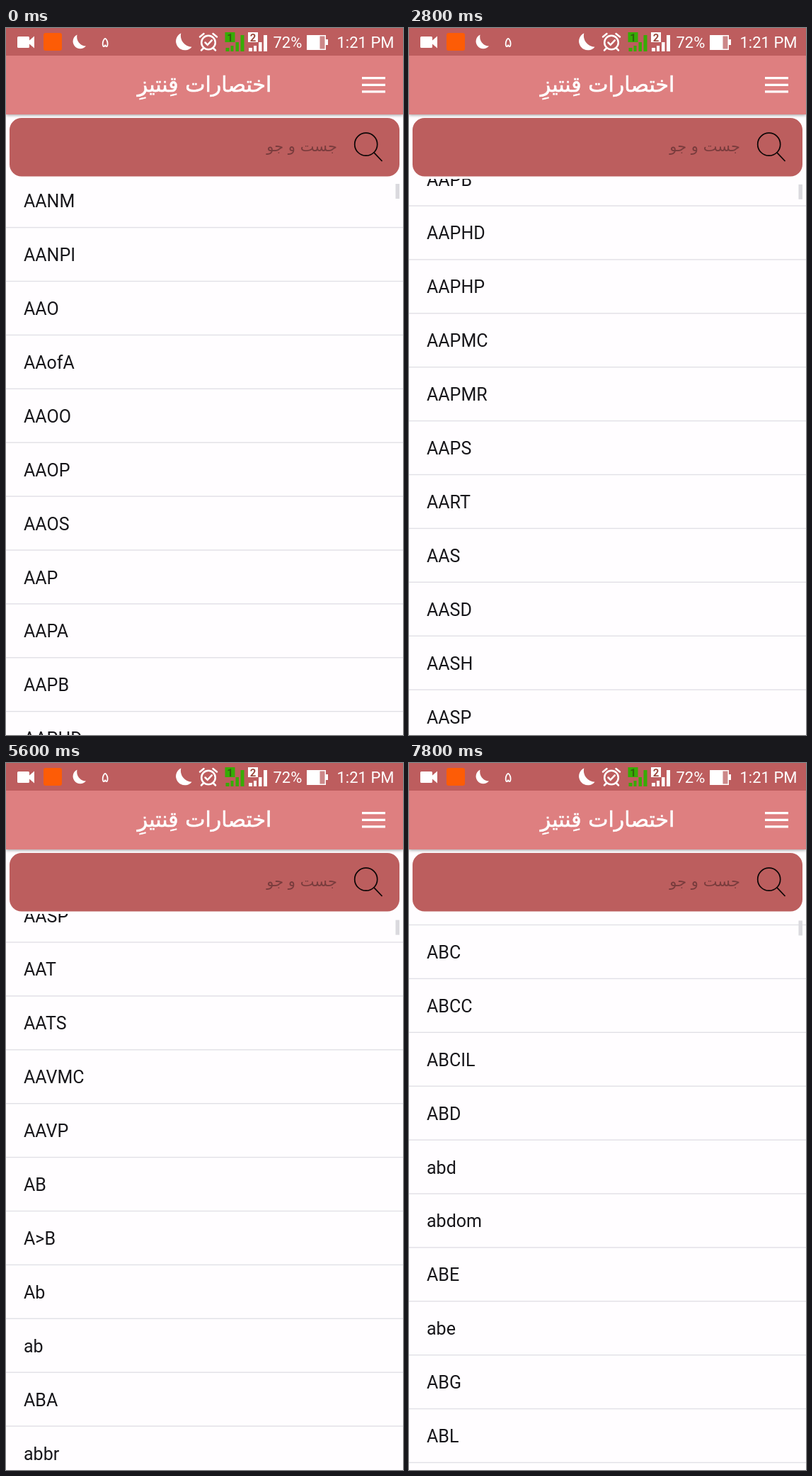
These frames come from a looping animation (561x998 px, 8 s). An HTML page:

```html
<!DOCTYPE html>
<html lang="fa">
<head>
<meta charset="utf-8">
<title>Abbreviation list</title>
<style>
  @property --scroll { syntax: "<number>"; inherits: true; initial-value: 0; }

  html, body { margin: 0; width: 100%; height: 100%; overflow: hidden; background: #fffdff; }
  #stage {
    display: block; width: 100%; height: 100%;
    font-family: Roboto, "Noto Sans", sans-serif;
    animation: scroll 8s infinite;
  }
  #rows { transform: translateY(calc(var(--scroll) * -1px)); }
  #thumb { transform: translateY(calc(var(--scroll) * .0011px)); }

  /* The screen refreshes every 200 ms, so each stretch moves in steps. */
  @keyframes scroll {
    0%    { --scroll: 0;    animation-timing-function: steps(1); }
    10%   { --scroll: 70;   animation-timing-function: steps(2); }
    15%   { --scroll: 270;  animation-timing-function: steps(1); }
    20%   { --scroll: 315.7; animation-timing-function: steps(6); }
    35%   { --scroll: 713.7; animation-timing-function: steps(4); }
    45%   { --scroll: 875.5; animation-timing-function: steps(10); }
    70%   { --scroll: 1470.7; animation-timing-function: steps(7); }
    87.5% { --scroll: 1910; animation-timing-function: steps(4); }
    97.5%, 100% { --scroll: 2254.2; animation-timing-function: steps(1); }
  }

  #rows { font-size: 25px; fill: #17161a; }
  #rows rect { fill: #e1e0e6; }
  .persian { font-family: "DejaVu Sans", sans-serif; direction: rtl; }
  .status { font-size: 22px; fill: #fff; }
  .line { fill: none; stroke: #fff; stroke-width: 2.5; stroke-linecap: round; }
  #header { filter: drop-shadow(0 1px 2px rgba(0, 0, 0, .4)); }
</style>
</head>
<body>
<svg id="stage" viewBox="0 0 561 998" preserveAspectRatio="none">
  <defs>
    <path id="moon" d="M-3 -10.5A10.4 10.4 0 1 0 9.5 5.5A13 13 0 0 1 -3 -10.5Z"/>
    <path id="bars" d="M1 28h5v5h-5zM8 25h4v8h-4zM15 20h4.5v13h-4.5zM22 10h5v23h-5zM0 6h14v14h-14z"/>
  </defs>
  <rect width="561" height="998" fill="#fffdff"/>

  <svg y="213" width="561" height="785" viewBox="0 213 561 785">
    <g id="rows"></g>
    <rect id="thumb" x="550.5" y="220" width="5.5" height="21" fill="#dad9de"/>
  </svg>

  <rect id="header" y="39" width="561" height="83" fill="#de7f80"/>
  <text class="persian" x="280.5" y="90" font-size="30" text-anchor="middle" fill="#fff" stroke="#fff" stroke-width=".6">اختصارات قِنتیزِ</text>
  <path d="M503 69h33v3.2h-33zM503 78.8h33v3.2h-33zM503 88.2h33v3.2h-33z" fill="#fff"/>

  <rect x="5" y="127" width="551" height="82.5" rx="17" fill="#bc5e5e"/>
  <text class="persian" x="468" y="174" font-size="21" fill="#793c3d">جست و جو</text>
  <g fill="none" stroke="#0c0606" stroke-width="1.7">
    <circle cx="508.7" cy="164.2" r="16"/>
    <path d="M520 175.8L531.5 188"/>
  </g>

  <g class="status">
    <rect width="561" height="39" fill="#bd5d5e"/>
    <path d="M17.5 12h14q1.5 0 1.5 1.5v4l7-6v17l-7-6v4q0 1.500-1.500 1.500h-14q-1.500 0-1.500-1.500v-13q0-1.500 1.500-1.500z"/>
    <rect x="53" y="7" width="26" height="25" rx="3" fill="#fd5c06"/>
    <use href="#moon" x="103.500" y="20"/>
    <text class="persian" x="140" y="27" font-size="20" text-anchor="middle">۵</text>
    <use href="#moon" transform="translate(251 20) scale(1.22)"/>
    <g class="line">
      <circle cx="286" cy="20.500" r="9.800"/>
      <path d="M274 12.500l5.500-4.500M298 12.500l-5.500-4.500M279 28.500l-3 3M293 28.500l3 3M281.500 20.500l3.300 3.300 6-6.500"/>
    </g>
    <use href="#bars" x="309.500" fill="#37ac05"/>
    <use href="#bars" x="342"/>
    <g font-size="15" font-weight="700" text-anchor="middle" fill="#9b4a3e">
      <text x="316.500" y="18.500" fill="#33600d">1</text>
      <text x="349" y="18.500">2</text>
    </g>
    <text x="377.500" y="28">72%</text>
    <path d="M425 10h27v6h3v8h-3v7h-27z"/>
    <rect x="443.500" y="11.500" width="7" height="18" fill="#cc8788"/>
    <text x="467.500" y="28">1:21 PM</text>
  </g>
</svg>
<script>
  const words = `AANM AANPI AAO AAofA AAOO AAOP AAOS AAP AAPA AAPB AAPHD AAPHP AAPMC
    AAPMR AAPS AART AAS AASD AASH AASP AAT AATS AAVMC AAVP AB A>B Ab ab ABA abbr
    ABC ABCC ABCIL ABD abd abdom ABE abe ABG ABL`.split(/\s+/);
  const rowHeight = 75.9, firstDivider = 281.6;
  const rows = document.getElementById("rows");

  function add(tag, attributes, text = "") {
    const node = document.createElementNS("http://www.w3.org/2000/svg", tag);
    for (const name in attributes) node.setAttribute(name, attributes[name]);
    node.textContent = text;
    rows.append(node);
  }

  words.forEach((word, i) => {
    const divider = firstDivider + i * rowHeight;
    add("text", { x: 25, y: divider - 28.4 }, word);
    add("rect", { y: divider - 0.7, width: 561, height: 1.4 });
  });
</script>
</body>
</html>
```
